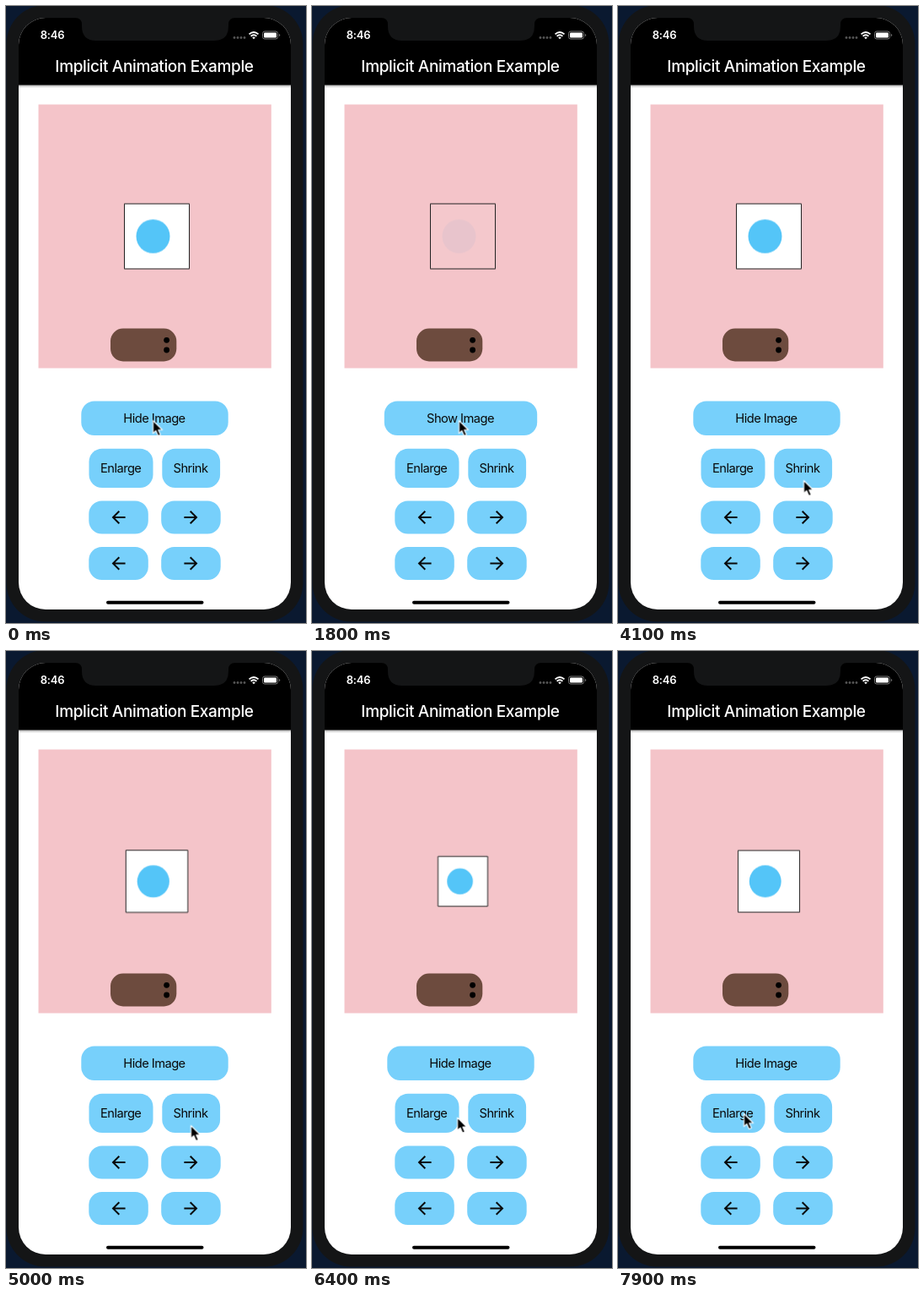
These frames come from a looping animation (356 by 730 pixels, 8 s). An HTML page:

```html
<!DOCTYPE html>
<html lang="en">
<head>
<meta charset="utf-8">
<title>Implicit Animation Example</title>
<style>
  html, body { margin: 0; width: 100%; height: 100%; overflow: hidden; background: #0a1930; }
  svg { display: block; width: 356px; height: 730px; }
  text { font-family: Inter, "Liberation Sans", sans-serif; text-anchor: middle; }
  .title { font-size: 19px; font-weight: 500; letter-spacing: -.36px; fill: #fff; }
  .clock { font-size: 13px; font-weight: 600; letter-spacing: -.2px; fill: #fff; }
  .button rect { fill: #77d0fb; }
  .button text { font-size: 14.7px; letter-spacing: -.55px; fill: #080808; }

  .hide, .show, .fade, .size, .cursor { animation: 8s linear infinite; }
  .hide { animation-name: hide; animation-timing-function: step-end; }
  .show { animation-name: show; animation-timing-function: step-end; }
  .fade { animation-name: fade; }
  .size { animation-name: size; }
  .cursor { animation-name: cursor; animation-timing-function: ease-in-out; }

  @keyframes hide { 0%, 32.5% { visibility: visible } 10.9% { visibility: hidden } }
  @keyframes show { 0%, 32.5% { visibility: hidden } 10.9% { visibility: visible } }
  @keyframes fade {
    0%, 10.9% { opacity: 1 }
    23.4%, 32.5% { opacity: 0 }
    45%, 100% { opacity: 1 }
  }
  @keyframes size {
    0%, 60.1% { transform: scale(1) }
    72.6%, 89% { transform: scale(.766) }
    100% { transform: scale(.972) }
  }
  @keyframes cursor {
    0%, 45% { transform: translate(174.5px, 490.5px) }
    50.5%, 55% { transform: translate(220.5px, 561.5px) }
    58%, 74% { transform: translate(219.5px, 561.5px) }
    84%, 100% { transform: translate(149.5px, 547.5px) }
  }
</style>
</head>
<body>
<svg viewBox="0 0 356 730">
  <defs>
    <clipPath id="screen"><rect x="15" y="14" width="323" height="700" rx="32"/></clipPath>
    <linearGradient id="shadow" x2="0" y2="1">
      <stop stop-color="#000" stop-opacity=".35"/>
      <stop offset="1" stop-color="#000" stop-opacity="0"/>
    </linearGradient>
    <path id="left" d="M8 -1H-4.17L1.42 -6.59 0 -8-8 0 0 8 1.41 6.59-4.17 1H8Z" fill="#080808"/>
  </defs>

  <!-- Phone -->
  <rect x=".5" y="-1" width="352" height="729.5" rx="46" fill="#141516"/>
  <g clip-path="url(#screen)">
    <rect x="15" y="14" width="323" height="700" fill="#fff"/>
    <rect x="15" y="93" width="323" height="4" fill="url(#shadow)"/>
    <rect x="15" y="14" width="323" height="79.5"/>
  </g>
  <path d="M82 14q8 0 8 8v2q0 17 17 17H247q17 0 17-17v-2q0-8 8-8Z" fill="#141516"/>

  <!-- Status and title -->
  <text class="clock" x="55" y="39">8:46</text>
  <g fill="#555">
    <circle cx="271" cy="37.5" r="1.4"/><circle cx="275" cy="37.5" r="1.4"/>
    <circle cx="279" cy="37.5" r="1.4"/><circle cx="283" cy="37.5" r="1.4"/>
  </g>
  <g fill="none" stroke="#fff" stroke-width="1.9">
    <path d="M288.5 33.4q5.5-4.8 11 0M290.6 35.7q3.4-2.8 6.8 0"/>
  </g>
  <path d="M292.2 37.2q1.8-1.5 3.6 0L294 39.2Z" fill="#fff"/>
  <rect x="304.5" y="30" width="18" height="9" rx="2.5" fill="none" stroke="#777"/>
  <rect x="306" y="31.5" width="15" height="6" rx="1.3" fill="#fff"/>
  <path d="M324 33v3q1.2-.4 1.2-1.5t-1.2-1.5" fill="#777"/>
  <text class="title" x="176" y="78">Implicit Animation Example</text>

  <!-- Stage -->
  <rect x="38.5" y="116.5" width="276.3" height="312" fill="#f4c4c9"/>
  <g transform="translate(179 272.5)">
    <g class="size">
      <g class="fade">
        <rect x="-38.5" y="-38.5" width="77" height="77" fill="#fff"/>
        <circle cx="-4.5" r="20" fill="#54c5f8"/>
      </g>
      <rect x="-38.5" y="-38.5" width="77" height="77" fill="none" stroke="#222" vector-effect="non-scaling-stroke"/>
    </g>
  </g>
  <rect x="124" y="381.5" width="78.3" height="39" rx="15" fill="#6d4b3e"/>
  <circle cx="190.6" cy="395.3" r="3.4"/>
  <circle cx="190.6" cy="407" r="3.4"/>

  <!-- Buttons -->
  <g class="button hide">
    <rect x="89.3" y="467.5" width="174.4" height="40.5" rx="15.5"/>
    <text x="176" y="493.3">Hide Image</text>
  </g>
  <g class="button show">
    <rect x="85.8" y="467.5" width="181.4" height="40.5" rx="15.5"/>
    <text x="176" y="493.3">Show Image</text>
  </g>
  <g class="button">
    <rect x="98.5" y="523.7" width="76" height="46.3" rx="15.5"/>
    <text x="136.2" y="552">Enlarge</text>
    <rect x="185.3" y="523.7" width="68.8" height="46.3" rx="15.5"/>
    <text x="219" y="552">Shrink</text>
    <rect x="98.3" y="585.5" width="70.5" height="39" rx="15.5"/>
    <rect x="184.2" y="585.5" width="70.5" height="39" rx="15.5"/>
    <rect x="98.3" y="640" width="70.5" height="39" rx="15.5"/>
    <rect x="184.2" y="640" width="70.5" height="39" rx="15.5"/>
  </g>
  <use href="#left" transform="translate(133.6 605)"/>
  <use href="#left" transform="translate(219.4 605) scale(-1 1)"/>
  <use href="#left" transform="translate(133.6 659.5)"/>
  <use href="#left" transform="translate(219.4 659.5) scale(-1 1)"/>
  <rect x="119" y="703.8" width="115.5" height="4" rx="2"/>

  <path class="cursor" d="M0 0V15.2L3.4 12 6 18 8.8 16.8 6.2 11H11Z" stroke="#fff" stroke-width="1.1" stroke-linejoin="round"/>
</svg>
</body>
</html>
```
